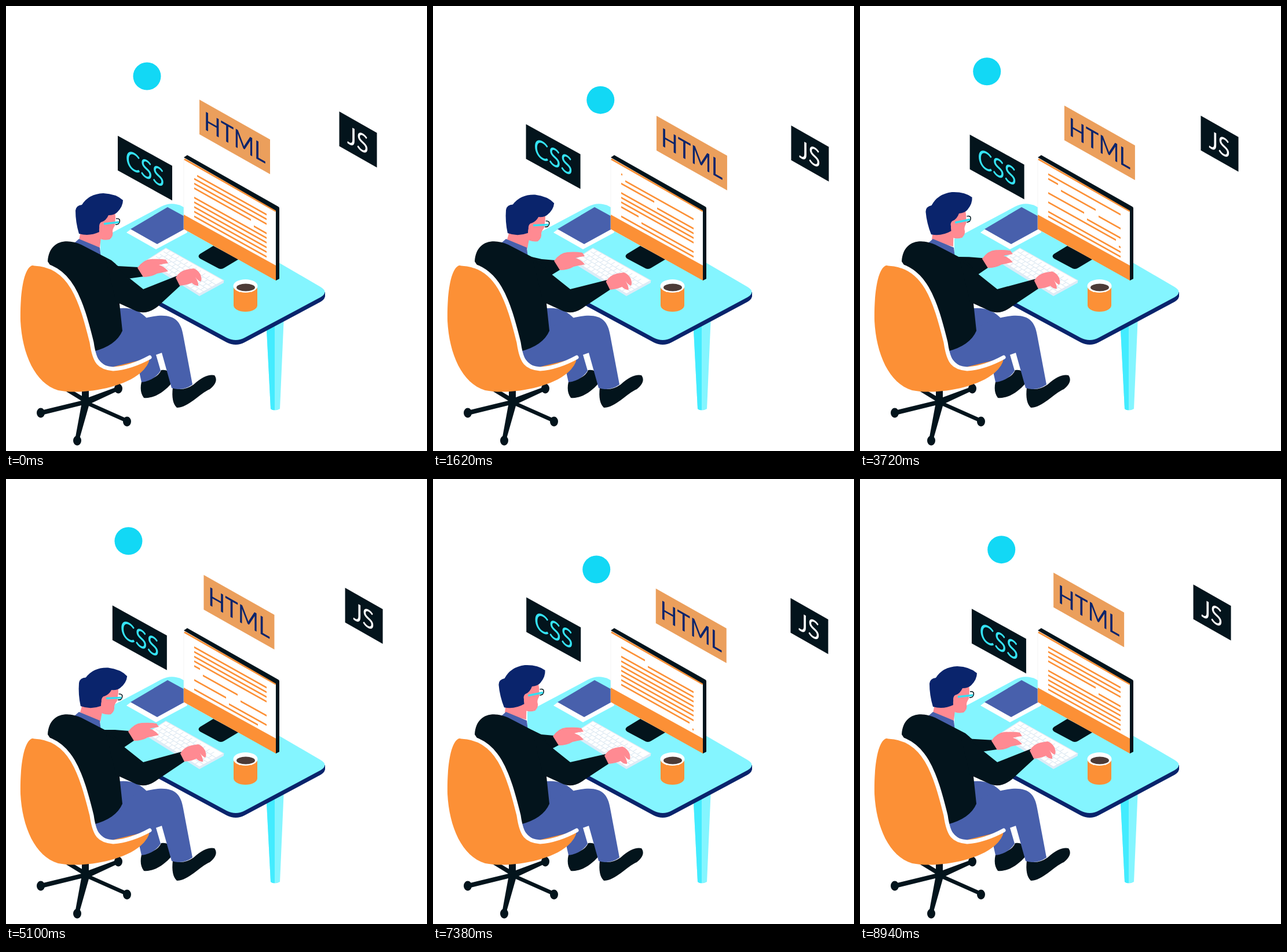
An HTML page that plays this animation: 727x770 px, repeating every 9000 ms.

```html
<!DOCTYPE html>
<html lang="en">
<head>
<meta charset="utf-8">
<title>Developer at a desk</title>
<style>
  html, body { margin: 0; width: 100%; height: 100%; overflow: hidden; background: #fff; }
  svg { display: block; width: 100vw; height: 100vh; }
  text { font: 44px Lato, sans-serif; text-anchor: middle; }
  .dark { fill: #03141c; } .orange { fill: #fc9036; } .blue { fill: #4860ac; }
  .navy { fill: #0a246c; } .cyan { fill: #84f5ff; } .skin { fill: #ff8a92; } .white { fill: #fff; }
</style>
</head>
<body>
<svg viewBox="0 0 727 770">
  <defs>
    <path id="top" d="M163 403 L268 347 Q285 338 303 346 L543 486 Q558 495 543 504 L412 574 Q397 582 381 574 L163 456Z"/>
  </defs>

  <!-- desk -->
  <path class="cyan" d="M449 540 L457 697 Q464 702 473 697 L480 535Z"/>
  <path fill="#43ecff" d="M449 540 L457 697 Q460 700 464 699 L464 540Z"/>
  <use href="#top" class="navy" y="8"/>
  <path class="navy" d="M536 495 H551 V503 L540 511Z"/>
  <use href="#top" class="cyan"/>
  <path class="white" d="M208 392 L216 386 L309 372 L313 392 L259 421Z"/>
  <path class="blue" d="M215 386 L279 348 L310 365 V385 L261 412Z"/>

  <!-- monitor -->
  <path class="dark" d="M335 429 L358 415 L402 438 L377 453 Q371 457 365 453 L335 437 Q330 433 335 429Z"/>
  <path class="white" stroke="#eee" stroke-width=".7" d="M307 264 L466 355 V474 L307 386Z"/>
  <path class="orange" d="M307 361 L466 449 V475 L307 386Z"/>
  <path fill="none" stroke="#fc9036" stroke-width="3" d="M308 265 L466 355"/>
  <path class="dark" d="M307 262 L313 258 L470 347 Q472 348 472 350 V472 L466 475 V354Z"/>
  <path id="code" transform="matrix(1 .56 0 1 325 291)" fill="none" stroke="#fc9036" stroke-width="3"/>

  <!-- keyboard and mug -->
  <path fill="#dcecf7" d="M243 440 L276 419 L376 475 V479 L334 502 L243 445Z"/>
  <path class="white" d="M243 440 L276 419 L376 475 L334 498Z"/>
  <path id="keys" fill="none" stroke="#dfeaf3" stroke-width="1.2"/>
  <path class="orange" d="M393 485 V518 A20.5 11 0 0 0 434 518 V485Z"/>
  <ellipse class="white" cx="413.500" cy="484.500" rx="21" ry="11.500"/>
  <ellipse cx="414" cy="487" rx="16" ry="6.500" fill="#4d3b37"/>

  <!-- chair base -->
  <g class="dark">
    <path d="M131 655 H143 V690 H131Z"/>
    <path d="M60 700 L130 683 L104 667 H118 L138 679 L192 659 L195 665 L148 687 L211 715 L208 721 L143 692 L126 752 L119 751 L130 691 L61 708Z"/>
    <ellipse cx="60" cy="704" rx="7" ry="8.500"/><ellipse cx="123" cy="752" rx="7" ry="8.500"/>
    <ellipse cx="209" cy="719" rx="7" ry="8.500"/><ellipse cx="194" cy="662" rx="7" ry="8.500"/>
  </g>

  <!-- legs -->
  <path class="dark" d="M234 650 Q262 645 268 630 Q280 628 284 638 V655 C276 664 258 680 238 678 Q230 668 234 650Z"/>
  <path class="blue" d="M190 524 Q222 518 243 540 L200 585Z M226 615 L258 600 L267 631 Q256 648 234 651Z"/>
  <path class="dark" d="M288 660 Q305 668 324 655 Q345 636 360 639 Q368 650 352 663 C335 670 315 695 295 695 Q285 686 288 660Z"/>
  <path class="blue" d="M152 597 C180 575 203 545 255 537 C288 532 302 543 306 570 L322 655 Q305 667 286 661 L269 600 Q240 610 205 628 Q165 632 152 597Z"/>

  <!-- far arm, head, body, near arm -->
  <path id="farSleeve" class="dark"/>
  <path id="farHand" class="skin" d="M207 445 Q217 431 230 430 Q247 429 256 431 L260 437 Q252 438 244 440 Q254 443 260 451 Q251 453 241 455 Q231 461 217 461Z"/>
  <g id="head">
    <path class="skin" d="M130 385 L165 392 L162 418 L126 405Z"/>
    <path class="skin" d="M165 345 L188 352 L189 366 L188 380 Q184 386 184 390 Q186 398 179 404 Q165 407 158 399 L150 385Z"/>
    <path class="navy" d="M126 394 Q120 374 120 354 Q121 345 131 344 Q143 325 168 324 Q190 325 202 336 Q202 347 192 357 Q187 362 177 362 Q173 371 165 374 Q160 380 161 391 Q144 399 126 394Z"/>
    <ellipse class="skin" cx="166" cy="381" rx="5" ry="7.500"/>
    <path fill="none" stroke="#03141c" stroke-width="1.500" d="M190 368 Q198 367 196 374 Q194 379 189 378"/>
    <path stroke="#35dff2" stroke-width="3.500" d="M169 377 L195 374"/>
  </g>
  <path class="blue" d="M118 410 L126 403 L162 418 L164 436Z"/>
  <path class="dark" d="M72 442 C74 406 104 401 130 413 L182 440 Q196 450 204 470 L196 515 L201 562 Q190 588 150 598 L110 500Z"/>
  <path id="nearSleeve" class="dark"/>
  <path id="nearHand" class="skin" d="M297 479 Q303 468 316 465 L328 463 Q336 466 340 474 Q343 483 340 486 Q335 484 331 478 Q337 488 336 493 Q329 493 325 488 Q316 492 304 493Z"/>

  <!-- seat -->
  <path class="orange" d="M45 449 C30 454 24 500 25 545 C28 602 50 653 90 665 C130 673 200 662 232 635 Q247 622 248 609 L178 626 Q155 620 150 590 C140 530 115 452 60 449Z"/>
  <path fill="none" stroke="#fff" stroke-width="7" stroke-linecap="round" d="M49 446 C112 448 130 510 148 582 C153 618 162 626 185 628 Q215 626 248 608"/>

  <circle id="badge" r="24" fill="#12d8f5"/>
  <g id="html"><path fill="#eb9f5c" d="M0 0 L122 69 V129 L0 60Z"/>
    <text class="navy" transform="matrix(.866 .49 0 1 61 81)">HTML</text></g>
  <g id="css"><path class="dark" d="M0 0 L94 52 V112 L0 60Z"/>
    <text fill="#35e3f5" transform="matrix(.866 .49 0 1 47 72)">CSS</text></g>
  <g id="js"><path class="dark" d="M0 0 L65 37 V97 L0 60Z"/>
    <text class="white" transform="matrix(.866 .49 0 1 32 65)">JS</text></g>
</svg>
<script>
const LOOP = 9000, STEP = 60;
const $ = id => document.getElementById(id);
const mix = (a, b, k) => a + (b - a) * k;
const smooth = k => (1 - Math.cos(Math.PI * k)) / 2;
const gentle = k => (k + smooth(k)) / 2;
const move = (id, x, y) => $(id).setAttribute('transform', `translate(${x} ${y})`);

// keys: [time, value, value, ...]
function track(t, keys, ease = smooth) {
  const i = keys.findIndex(key => key[0] > t);
  const a = keys[i - 1], b = keys[i];
  const k = ease((t - a[0]) / (b[0] - a[0]));
  return a.slice(1).map((v, n) => mix(v, b[n + 1], k));
}

// one swing out and back, twice per loop
const swing = (t, times, from, to) =>
  track(t, times.map((time, i) => [time, ...(i % 2 ? to : from)]));

// rows of text with travelling paragraph breaks
const ROW = 125, ROWS = 10, BREAK = 130, FLOW = 2400;
const breaks = [-1927, -850, -660, -430, -125, 473];
function codePath(t) {
  const shift = t / LOOP * FLOW;
  const gaps = [...breaks, ...breaks.map(b => b - FLOW)].map(b => b + shift).sort((a, b) => a - b);
  let d = '', start = -BREAK;
  for (const gap of [...gaps, ROW * ROWS + 1]) {
    for (let r = 0; r < ROWS; r++) {
      const a = Math.max(start - r * ROW, 0), b = Math.min(gap - r * ROW, ROW);
      if (b > a) d += `M${a} ${r * 8.1}H${b}`;
    }
    start = gap + BREAK;
  }
  return d;
}

function keyLines() {
  const at = (u, v) => `${243 + 91 * u + 33 * v} ${440 + 58 * u - 21 * v}`;
  let d = `M${at(0, 0)}L${at(1, 0)}L376 475L276 419Z`;
  for (let r = 1; r < 5; r++) d += `M${at(.03, r / 5)}L${at(1.02, r / 5)}`;
  for (let r = 0; r < 5; r++)
    for (let c = 1; c < 12; c++) {
      const u = (c + r % 2 * .4) / 12;
      d += `M${at(u, r / 5)}L${at(u, (r + 1) / 5)}`;
    }
  return d;
}
$('keys').setAttribute('d', keyLines());

function draw(t) {
  move('html', ...swing(t, [0, 2200, 4620, 6750, LOOP], [334, 162], [396, 195.500]));
  move('css', ...swing(t, [0, 2000, 4150, 6950, LOOP], [193, 224.500], [157.500, 202.500]));
  move('js', ...swing(t, [0, 2250, 4450, 6700, LOOP], [575.500, 182.500], [628, 212]));
  move('badge', ...track(t, [[0, 243.500, 121.500], [2250, 303, 175], [4450, 185, 88],
    [6700, 295, 168], [LOOP, 243.500, 121.500]], gentle));

  const [nod] = track(t, [[0, 0], [900, 4.5], [2400, 4.5], [3300, -5], [3900, -5], [4800, 4.5],
    [6200, 4.5], [7100, -5], [7700, -5], [LOOP, 0]]);
  $('head').setAttribute('transform', `rotate(${nod} 140 430)`);

  // hands reach in at the loop ends and tap in between
  const [reach] = track(t, [[0, 1], [1000, 0], [8000, 0], [LOOP, 1]]);
  const tap = (1 + Math.cos(2 * Math.PI * (t / 660 - .7))) / 2;
  const fx = mix(4 * tap, 20, reach), fy = mix(-8 * tap, 8, reach);
  const nx = mix(-1 + 5 * tap, -4, reach), ny = mix(-4 * tap, -9, reach);
  move('farHand', fx, fy);
  move('nearHand', nx, ny);
  $('farSleeve').setAttribute('d',
    `M170 434L${187 + fx / 3} ${442 + fy}L${209 + fx} ${444 + fy}Q${217 + fx} ${450 + fy} ${218 + fx} ${460 + fy}L${203 + fx / 3} ${468 + fy / 2}L190 475Z`);
  $('nearSleeve').setAttribute('d',
    `M172 438L237 490L${299 + nx} ${476 + ny}Q${307 + nx} ${481 + ny} ${307 + nx} ${491 + ny}L262 520Q243 535 225 528L190 512Z`);
  $('code').setAttribute('d', codePath(t));
}

function frame(now) {
  draw(Math.floor(now % LOOP / STEP) * STEP);
  requestAnimationFrame(frame);
}
draw(0);
requestAnimationFrame(frame);
</script>
</body>
</html>
```
